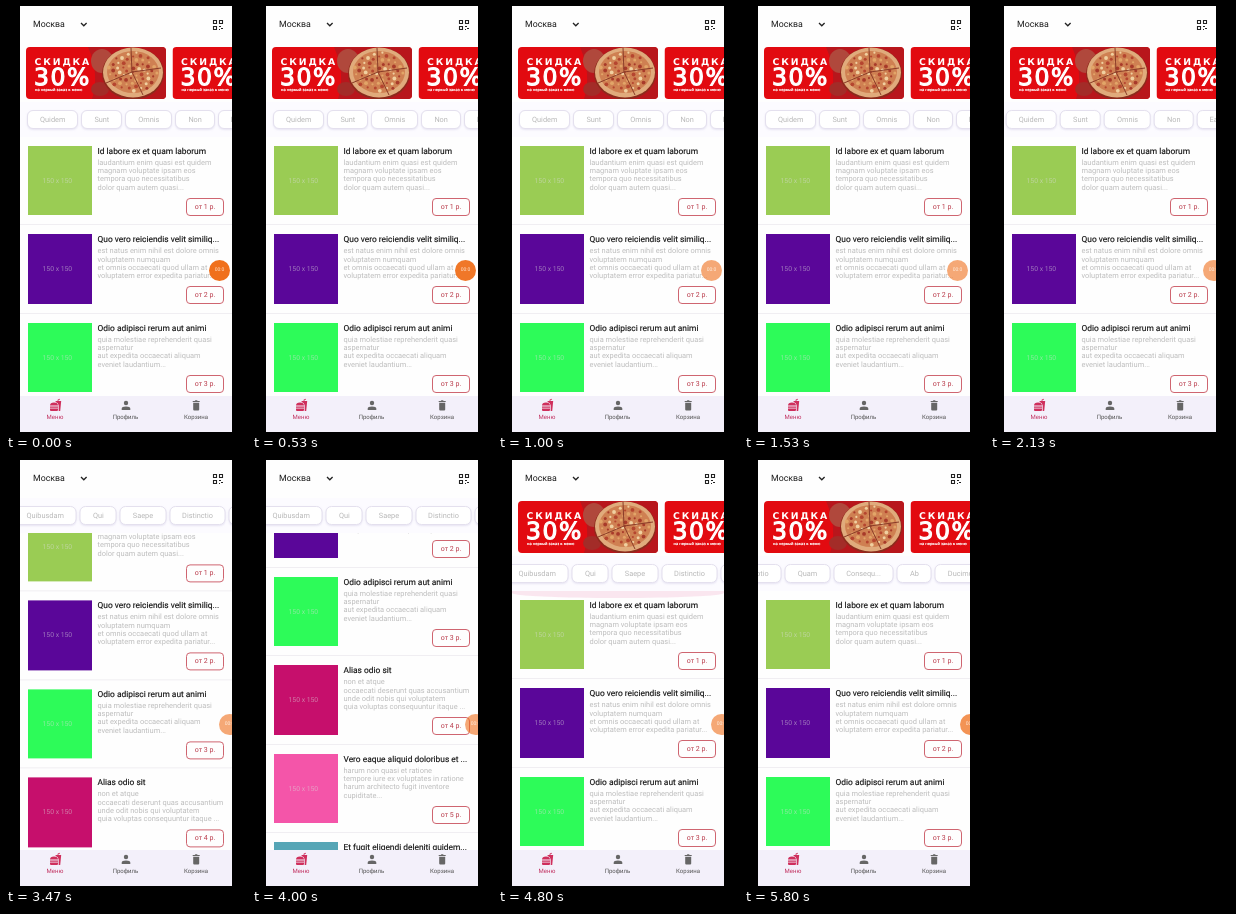
Recreate the animation shown at these times as an HTML page. Size 240 by 426 pixels, loop 5870 ms.

```html
<!DOCTYPE html>
<html lang="ru">
<head>
<meta charset="utf-8">
<title>Меню</title>
<style>
html, body { margin: 0; width: 100%; height: 100%; overflow: hidden; background: #000; }
body { font-family: Roboto, "Noto Sans", sans-serif; text-rendering: geometricPrecision; }
#app { position: absolute; left: 14px; top: 0; width: 212px; height: 426px; overflow: hidden; background: #fefefe; }
#app div, #app svg { position: absolute; }
#page { top: 0; left: 0; width: 212px; }
.item { left: 0; width: 212px; height: 88.5px; }
.item::after { content: ""; position: absolute; left: 0; right: 0; bottom: 0; height: 1px; background: #f0eef2; }
.pic { left: 8px; top: 9.4px; width: 64px; height: 69.4px; line-height: 71px; text-indent: 14.5px; font-size: 6.8px; color: #ddd8; white-space: nowrap; }
.name { left: 77.5px; top: 10px; font-size: 8.4px; line-height: 10px; color: #0c0c0c; -webkit-text-stroke: .12px #0c0c0c; white-space: nowrap; }
.text { left: 77.5px; top: 22px; font-size: 7.45px; line-height: 8.4px; color: #bdbdbd; white-space: pre; }
.price { left: 166px; top: 61px; width: 36px; height: 16px; border: 1px solid #cf6570; border-radius: 4px; font-size: 7px; line-height: 16px; text-align: center; color: #b93b4b; }
#bar { left: 0; top: 96px; width: 212px; height: 34.5px; background: #fcfbff; overflow: hidden; }
#chips { left: 7px; top: 7.5px; display: flex; gap: 3px; }
#chips span { flex: none; box-sizing: border-box; height: 19px; padding: 0 12px; border: 1px solid #e4e0ee; border-radius: 6px; background: #fff; box-shadow: 0 1px 2px #c9c4e066; font-size: 7.35px; line-height: 17px; color: #b8b8b8; }
#glow { left: 0; top: 130px; width: 212px; height: 8px; background: #fae6ef; border-radius: 0 0 50% 50% / 0 0 5px 5px; }
#head { left: 0; top: 0; width: 212px; height: 38px; background: #fefefe; }
#city { left: 13px; top: 13px; font-size: 8.8px; line-height: 12px; color: #1c1c1c; }
#nav { left: 0; top: 390px; width: 212px; height: 36px; background: #f3f0fa; }
#nav div { top: 17.5px; width: 50px; font-size: 6px; line-height: 8px; text-align: center; color: #555; }
#bubble { top: 253.5px; width: 21px; height: 21px; margin-left: -24.5px; border-radius: 50%; background: #f0701c; color: #ffe3cd; font-size: 5px; line-height: 21px; text-align: center; }
</style>
</head>
<body>
<div id="app">
  <div id="page">
    <svg width="212" height="96">
      <defs>
        <clipPath id="card"><rect width="140" height="52" rx="4"/></clipPath>
        <g id="banner" clip-path="url(#card)">
          <rect width="140" height="52" fill="#e20a10"/>
          <path d="M62 0h78v52H66q8-24-4-52z" fill="#b8161c"/>
          <ellipse cx="76" cy="14" rx="11" ry="12" fill="#b0483c"/>
          <ellipse cx="74" cy="42" rx="9" ry="7" fill="#a32c28"/>
          <ellipse cx="107" cy="26.500" rx="31" ry="26" fill="#8d2a1c"/>
          <ellipse cx="107" cy="25.500" rx="30" ry="25" fill="#e0ab7c"/>
          <ellipse cx="107" cy="25" rx="26" ry="21" fill="#cf8052"/>
          <g id="toppings"></g>
          <path d="M106 25L105 1M106 25L135 21M106 25L117 48M106 25L80 36" stroke="#8a3c28"/>
          <g fill="#fff" stroke="#fff" font-family="DejaVu Sans, sans-serif">
            <text x="8.500" y="18" font-size="9.300" font-weight="bold" letter-spacing="1.900" stroke="none">СКИДКА</text>
            <text x="8" y="37.500" font-size="23.500" letter-spacing="1.500" stroke-width="1.200">30%</text>
            <text x="9" y="44" font-size="3.700" stroke-width=".2">на первый заказ в меню</text>
          </g>
        </g>
      </defs>
      <use href="#banner" x="6" y="41"/>
      <use href="#banner" x="152.500" y="41"/>
    </svg>
    <div id="list"></div>
    <div id="glow"></div>
  </div>
  <div id="bar"><div id="chips"></div></div>
  <div id="head">
    <div id="city">Москва</div>
    <svg width="212" height="38" fill="none" stroke="#222">
      <path d="M61 17l2.800 2.800 2.800-2.800" stroke-width="1.300"/>
      <path d="M193.500 14.500h3v3h-3zM199.500 14.500h3v3h-3zM193.500 20.500h3v3h-3z" stroke-width="1.100"/>
      <path d="M199 20.500h2M201 22.500h2M199 23.500h1" stroke-width="1.200"/>
    </svg>
  </div>
  <div id="nav">
    <svg width="212" height="16">
      <g fill="#cf2f5c">
        <path d="M30 9.500q0-3 4-3t4 3zM30 10.500h8v1.200h-8zM30 12.500h8v1.500q0 1-1 1h-6q-1 0-1-1z"/>
        <path d="M35.500 5h2l.3-1.500 2-.8.3.8-1.500.6-.2.900h2.800L40.200 15h-1.500V9.500q-.3-2.700-3-3.500z"/>
      </g>
      <g fill="#666">
        <circle cx="106" cy="7" r="2.200"/>
        <path d="M101.700 14v-1.300q0-2.300 4.300-2.300t4.300 2.300V14z"/>
        <path d="M173.200 6.800h6v6.700q0 1-1 1h-4q-1 0-1-1zM172.700 5h2l.7-.7h1.600l.7.7h2v1h-7z"/>
      </g>
    </svg>
    <div style="left:10px;color:#c23261">Меню</div>
    <div style="left:80.500px">Профиль</div>
    <div style="left:151px">Корзина</div>
  </div>
  <div id="bubble">00:0</div>
</div>
<script>
const $ = id => document.getElementById(id);
const LOOP = 5870, PITCH = 88.5, PIN = 58;

const items = [
  ['#9acc54', 'Id labore ex et quam laborum', 'laudantium enim quasi est quidem\nmagnam voluptate ipsam eos\ntempora quo necessitatibus\ndolor quam autem quasi...'],
  ['#5a0699', 'Quo vero reiciendis velit similiq...', 'est natus enim nihil est dolore omnis\nvoluptatem numquam\net omnis occaecati quod ullam at\nvoluptatem error expedita pariatur...'],
  ['#2dfb59', 'Odio adipisci rerum aut animi', 'quia molestiae reprehenderit quasi\naspernatur\naut expedita occaecati aliquam\neveniet laudantium...'],
  ['#c60f6c', 'Alias odio sit', 'non et atque\noccaecati deserunt quas accusantium\nunde odit nobis qui voluptatem\nquia voluptas consequuntur itaque ...'],
  ['#f455a9', 'Vero eaque aliquid doloribus et ...', 'harum non quasi et ratione\ntempore iure ex voluptates in ratione\nharum architecto fugit inventore\ncupiditate...'],
  ['#56a6b6', 'Et fugit eligendi deleniti quidem...', 'doloribus at sed quis culpa\ndeserunt consectetur qui\naccusamus dolor...']
];
$('list').innerHTML = items.map(([color, name, text], i) =>
  `<div class="item" style="top:${130.6 + i * PITCH}px">
    <div class="pic" style="background:${color}">150 x 150</div>
    <div class="name">${name}</div><div class="text">${text}</div>
    <div class="price">от ${i + 1} р.</div></div>`).join('');

const labels = 'Quidem Sunt Omnis Non Ea Autem Velit Quibusdam Qui Saepe Distinctio Nemo Iusto Optio Quam Consequ... Ab Ducimus Rerum'.split(' ');
$('chips').innerHTML = labels.map(s => `<span>${s}</span>`).join('');

// Scatter toppings on a sunflower spiral
const tints = ['#b5452f', '#f0d0a0', '#a83a2a', '#e2a568'];
$('toppings').innerHTML = Array.from({ length: 60 }, (_, i) => {
  const a = i * 2.4, r = Math.sqrt(i / 60);
  return `<circle cx="${107 + 25 * r * Math.cos(a)}" cy="${25 + 20 * r * Math.sin(a)}" r="${1.1 + i % 3 * .4}" fill="${tints[i % 4]}"/>`;
}).join('');

const smooth = p => p * p * (3 - 2 * p);
const fling = p => 1 - (1 - p) ** 3;

// Value at t along [time, value, easing into this key]
function track(t, keys) {
  const i = keys.findIndex(k => k[0] > t);
  if (i < 0) return keys[keys.length - 1][1];
  if (i === 0) return keys[0][1];
  const [t0, v0] = keys[i - 1], [t1, v1, ease = smooth] = keys[i];
  return v0 + (v1 - v0) * ease((t - t0) / (t1 - t0));
}

// Row shift that puts the labelled chip's left edge at x
const row = $('chips');
const shiftTo = (label, x) =>
  x - row.offsetLeft - row.children[labels.indexOf(label)].offsetLeft;

const first = shiftTo('Quibusdam', -5), second = shiftTo('Quam', 26.5);
const chipKeys = [[2060, 0], [2130, -4], [2900, first, fling], [3150, first], [3400, first - 1.5],
  [5000, first - 1.5], [5080, first - 6], [5780, second, fling]];
const scrollKeys = [[3150, 0], [3850, 200], [4150, 200], [4720, 0]];
const glowKeys = [[4600, 0], [4730, 1], [4830, 1], [5080, 0]];
const bubbleKeys = [[1750, 213.5], [2080, 223.5], [5300, 223.5], [5700, 226.5]];
const fadeKeys = [[450, 1], [800, .6], [5300, .6], [5700, .75]];

function frame(now) {
  const t = now % LOOP, scroll = track(t, scrollKeys);
  $('page').style.transform = `translateY(${-scroll}px)`;
  $('bar').style.transform = `translateY(${-Math.min(scroll, PIN)}px)`;
  row.style.transform = `translateX(${track(t, chipKeys)}px)`;
  $('glow').style.opacity = track(t, glowKeys);
  $('bubble').style.left = track(t, bubbleKeys) + 'px';
  $('bubble').style.opacity = track(t, fadeKeys);
  requestAnimationFrame(frame);
}
frame(0);
</script>
</body>
</html>
```
